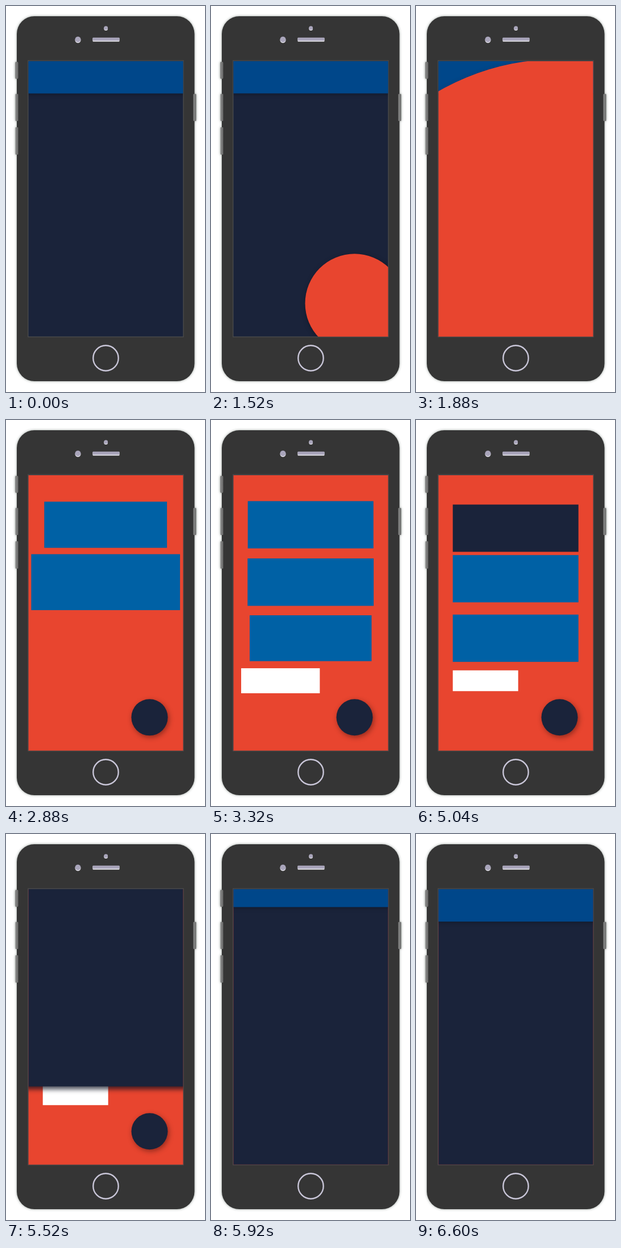
Recreate the animation shown at these times as an HTML page. Size 350 px wide and 678 px high, loop 6680 ms.

```html
<!DOCTYPE html>
<html lang="en">
<head>
<meta charset="utf-8">
<title>Phone transitions</title>
<style>
  html, body { margin: 0; width: 100%; height: 100%; overflow: hidden; background: #fff; }
  svg { display: block; width: 350px; height: 678px; }
  .lift { filter: drop-shadow(2px 3px 5px rgba(0, 0, 0, .38)); }
  .bar { filter: drop-shadow(0 2px 3px rgba(0, 0, 0, .25)); }
  .frame { filter: drop-shadow(0 0 2px rgba(70, 85, 75, .6)); }
</style>
</head>
<body>
<svg viewBox="0 0 350 678">
  <defs>
    <clipPath id="screen"><rect x="39.5" y="97" width="272" height="483.7"/></clipPath>
    <clipPath id="cardClip"><rect x="64.7" y="243.3" width="221" height="83"/></clipPath>
    <linearGradient id="metal">
      <stop offset="0" stop-color="#8b8c8b"/>
      <stop offset="1" stop-color="#6a6a6a"/>
    </linearGradient>
  </defs>

  <g class="frame">
    <rect x="19" y="18" width="312.5" height="641" rx="31" fill="#353535"/>
    <g fill="url(#metal)">
      <rect x="16" y="98" width="5.5" height="30" rx="2"/>
      <rect x="16.5" y="154.5" width="5" height="47.5" rx="1"/>
      <rect x="16.5" y="213" width="5" height="48" rx="1"/>
      <rect x="329.5" y="154.5" width="5" height="47.5" rx="1"/>
    </g>
  </g>
  <g fill="#f4f3f8">
    <circle cx="126.5" cy="60" r="5"/>
    <circle cx="175.7" cy="39.7" r="3.4"/>
    <rect x="152.5" y="56" width="47" height="6.6" rx="1"/>
  </g>
  <g fill="#a9a5bb">
    <circle cx="126.5" cy="58.8" r="5"/>
    <circle cx="175.7" cy="38.7" r="3.4"/>
    <rect x="152.5" y="55.4" width="47" height="5.6" rx="1"/>
  </g>
  <circle cx="175.5" cy="618.5" r="22.2" fill="none" stroke="#c9c6d8" stroke-width="2.4"/>
  <rect x="38.8" y="96" width="273.2" height="485.2" fill="#1a233a" stroke="#4b4b4b" stroke-width="1.4"/>

  <g clip-path="url(#screen)">
    <rect id="oldBar" class="bar" x="30" y="87" width="292" fill="#00478a"/>
    <circle id="flood" class="lift" cx="252.5" cy="522.3" fill="#e8452f"/>
    <rect id="cardA" fill="#0061a5"/>
    <rect id="cardB" fill="#0061a5"/>
    <rect id="cardC" fill="#0061a5"/>
    <rect id="button" fill="#fff"/>
    <circle id="fab" class="lift" cx="252.5" cy="522.3" fill="#1a233a"/>
    <circle id="ripple" cx="175.2" cy="284.8" fill="#1a233a" clip-path="url(#cardClip)"/>
    <rect id="panel" fill="#1a233a"/>
    <rect id="newBar" class="bar" x="30" y="87" width="292" fill="#00478a"/>
  </g>
</svg>
<script>
const LOOP = 6680;
const CARD_X = 175.2, CARD_W = 221, CARD_H = 83;
const ROW_A = 184, ROW_B = 284.8, ROW_C = 383.3;
const el = id => document.getElementById(id);

const progress = (t, start, length) => Math.min(1, Math.max(0, (t - start) / length));
const easeOut = p => 1 - (1 - p) ** 2;
const elastic = p => p <= 0 ? 0 : p >= 1 ? 1
  : 1 - 2 ** (-10 * p) * Math.cos(4 * Math.PI * p);
const pop = (t, start) => elastic(progress(t, start, 800));
const mix = (a, b, p) => a + (b - a) * p;

function show(id, on) {
  el(id).style.display = on ? "" : "none";
}

function placeRect(id, cx, cy, w, h, scale) {
  const node = el(id);
  show(id, scale > 0);
  node.setAttribute("x", cx - w * scale / 2);
  node.setAttribute("y", cy - h * scale / 2);
  node.setAttribute("width", w * scale);
  node.setAttribute("height", h * scale);
}

function placeCard(id, cy, scale) {
  placeRect(id, CARD_X, cy, CARD_W, CARD_H, scale);
}

function setRadius(id, r) {
  show(id, r > 0);
  el(id).setAttribute("r", Math.max(0, r));
}

function setBar(id, t, on) {
  show(id, on);
  const grown = elastic(progress(t, 5857, 1000));
  el(id).setAttribute("height", 10 + 56.5 * grown);
}

function draw(t) {
  // The bar is still settling when the loop restarts.
  setBar("oldBar", t + LOOP, t < 2200);
  setBar("newBar", t, t > 5857);

  const flood = easeOut(progress(t, 1483, 600));
  setRadius("flood", 32 * pop(t, 384) * mix(1, 15, flood));

  const swap = easeOut(progress(t, 4541, 662));
  const picked = t >= 4280;
  setRadius("fab", 32 * pop(t, 2226));
  placeCard("cardA", mix(ROW_A, ROW_B, swap), pop(t, 2456));
  placeCard("cardB", ROW_B, picked ? 0 : pop(t, 2686));
  placeCard("cardC", ROW_C, pop(t, 2916));
  placeRect("button", 122.2, 458, 115, 36.5, pop(t, 3146));

  setRadius("ripple", picked ? 0 : 120.5 * easeOut(progress(t, 3518, 600)));

  const growth = 9 * easeOut(progress(t, 5202, 900));
  placeCard("panel", mix(ROW_B, ROW_A, swap), picked ? 1 + growth : 0);
  el("panel").style.filter = growth > 0
    ? `drop-shadow(0 ${growth * 1.1}px ${growth * .85}px rgba(10, 12, 28, .75))`
    : "none";
}

const began = performance.now();
function tick() {
  draw((performance.now() - began) % LOOP);
  requestAnimationFrame(tick);
}
tick();
</script>
</body>
</html>
```
